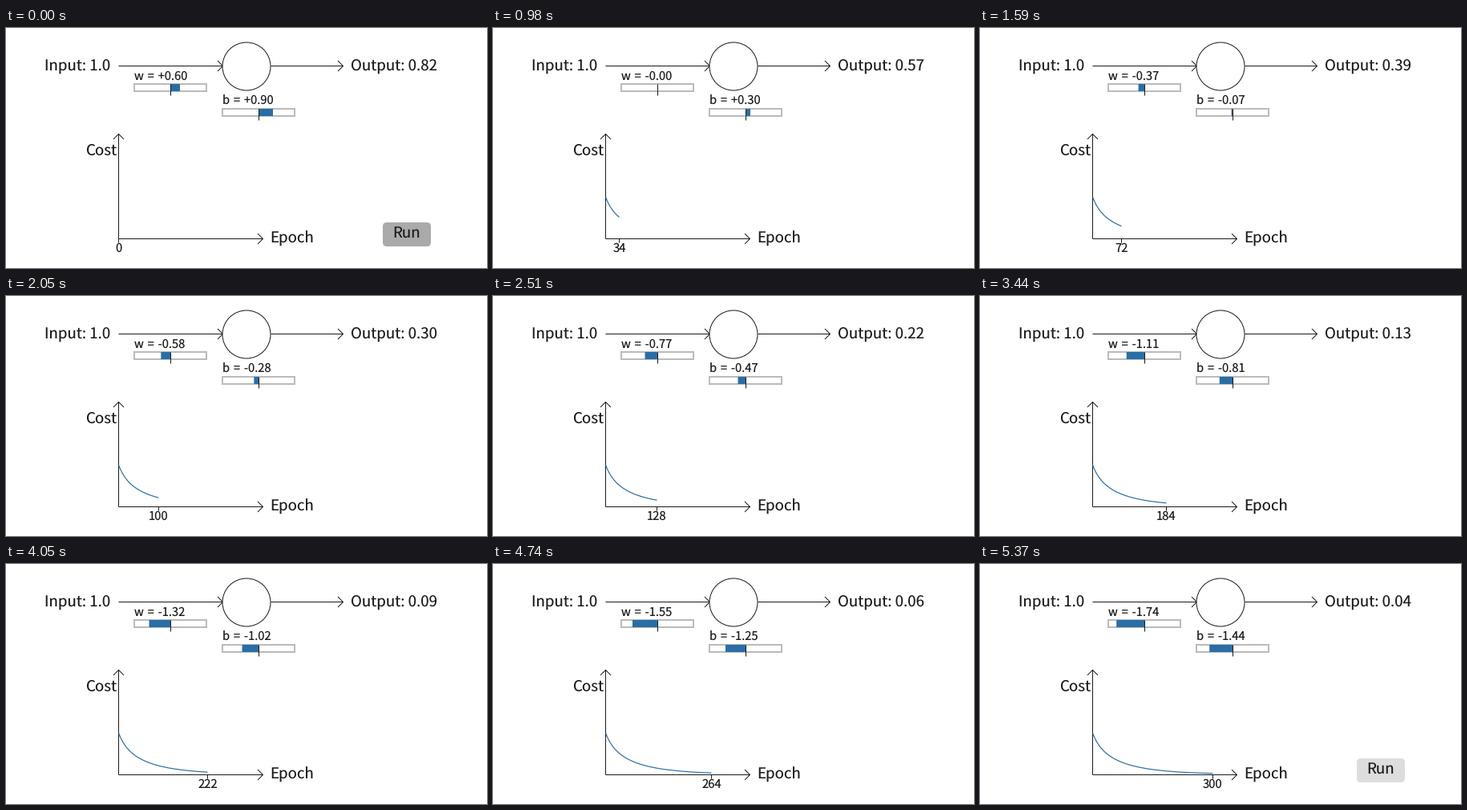
Recreate the animation shown at these times as a matplotlib script. Size 600x300 px, loop 6210 ms.

```python
import math

import matplotlib.pyplot as plt
from matplotlib.animation import FuncAnimation
from matplotlib.patches import Circle, FancyBboxPatch, Rectangle

W, H, DPI = 600, 300, 100
LOOP, INTERVAL = 6210, 15
START, STEP, STEPS = 440, 76.8, 64
END = 5370
EPOCHS, RATE = 300, 0.005
BLUE, GREY, INK, TEXT = "#2a6ea6", "#bbbbbb", "#1a1a1a", "#1c1c1c"
ORIGIN = (140, 263)
BIG, SMALL = 18.7, 14.7
GAP = "\u2004"  # third-of-an-em space

plt.rcParams["font.family"] = ["Noto Sans CJK JP", "DejaVu Sans"]
plt.rcParams["font.weight"] = 350
plt.rcParams["text.hinting"] = "none"


def px(size):
    return size * 72 / DPI


fig = plt.figure(figsize=(W / DPI, H / DPI), dpi=DPI, facecolor="white")
ax = fig.add_axes([0, 0, 1, 1])
ax.set_xlim(0, W)
ax.set_ylim(H, 0)
ax.axis("off")


def train():
    """Gradient descent on one sigmoid neuron: input 1, wanted output 0."""
    w, b = 0.6, 0.9
    history = []
    for _ in range(EPOCHS + 2):
        a = 1 / (1 + math.exp(-w - b))
        history.append((w, b, a, -math.log(1 - a)))
        w -= RATE / (1 - a)
        b -= RATE / (1 - a)
    return history


def line(xs, ys, color=INK, width=1.0, z=2):
    return ax.plot(xs, ys, color=color, lw=px(width), zorder=z,
                   solid_capstyle="butt", solid_joinstyle="miter")[0]


def label(x, y, text, size=BIG, ha="left"):
    return ax.text(x, y, text, fontsize=px(size), color=TEXT,
                   ha=ha, va="baseline", zorder=6)


def arrow(x0, y0, x1, y1, head=6.5):
    # whole coordinates snap the shaft to the pixel whose centre is half further
    line([x0, x1], [y0, y1])
    length = math.hypot(x1 - x0, y1 - y0)
    ux, uy = (x1 - x0) / length, (y1 - y0) / length
    tip_x, tip_y = x1 + 0.5, y1 + 0.5
    back = tip_x - ux * head, tip_y - uy * head
    line([back[0] - uy * head, tip_x, back[0] + uy * head],
         [back[1] + ux * head, tip_y, back[1] - ux * head])


class Slider:
    SCALE, WIDTH, HEIGHT = 20, 90, 9

    def __init__(self, name, x, y, baseline):
        self.name = name
        self.mid = x + self.WIDTH / 2
        self.fill = Rectangle((self.mid, y), 0, self.HEIGHT, fc=BLUE,
                              lw=0, zorder=4, snap=False)
        ax.add_patch(Rectangle((x, y), self.WIDTH, self.HEIGHT, fc="none",
                               ec=GREY, lw=px(2), zorder=3))
        ax.add_patch(self.fill)
        line([self.mid] * 2, [y, y + 14], z=5)
        self.text = label(x, baseline, "", SMALL)

    def set(self, value):
        self.fill.set_x(self.mid + min(value, 0) * self.SCALE)
        self.fill.set_width(abs(value) * self.SCALE)
        self.text.set_text(f"{self.name}{GAP}={GAP}{value:+.2f}")


history = train()
curve_x = [ORIGIN[0] + 0.5 + e / 2 for e in range(EPOCHS + 1)]
curve_y = [ORIGIN[1] - 30.5 * h[3] for h in history]

# neuron
arrow(140, 47, 270, 47)
arrow(330, 47, 420, 47)
ax.add_patch(Circle((300, 48), 30, fc="white", ec=INK, lw=px(1), zorder=3))
label(48, 53, "Input: 1.0")
output = label(430, 53, "")
sliders = Slider("w", 160, 70, 65), Slider("b", 270, 101, 95.4)

# cost graph
arrow(*ORIGIN, ORIGIN[0], 132)
arrow(*ORIGIN, 320, ORIGIN[1])
label(99.2, 158.4, "Cost")
label(329.5, 268.7, "Epoch")
curve = line([], [], BLUE, 1.2, 3)
tick = line([], [])
counter = label(0, 280, "", 14.8, "center")

button = FancyBboxPatch((475, 248), 50, 20, lw=0, zorder=5,
                        boxstyle="round,pad=5,rounding_size=5")
ax.add_patch(button)
run = label(500, 263, "Run", ha="center")


def epoch_at(t):
    if t < START:
        return 0
    if t >= END:
        return EPOCHS
    k = min(int((t - START) / STEP), STEPS - 1)
    return round(1.1 + 4.7 * k)


def draw(n):
    t = (n + 1) * INTERVAL - 1
    epoch = epoch_at(t)
    # each epoch's update is applied before its values are shown
    done = epoch + 1 if epoch else 0
    w, b, a, _ = history[done]
    for slider, value in zip(sliders, (w, b)):
        slider.set(value)
    output.set_text(f"Output: {a:.2f}")

    curve.set_data(curve_x[:done], curve_y[:done])
    x = ORIGIN[0] + epoch / 2
    tick.set_data([x, x], [ORIGIN[1], ORIGIN[1] + 5])
    counter.set_x(curve_x[epoch])
    counter.set_text(str(epoch))

    idle = t < START or t >= END
    button.set_visible(idle)
    run.set_visible(idle)
    button.set_facecolor("#aaaaaa" if t < START else "#dddddd")
    return []


anim = FuncAnimation(fig, draw, frames=LOOP // INTERVAL, interval=INTERVAL,
                     repeat=True, repeat_delay=0, blit=False)
plt.show()
```
